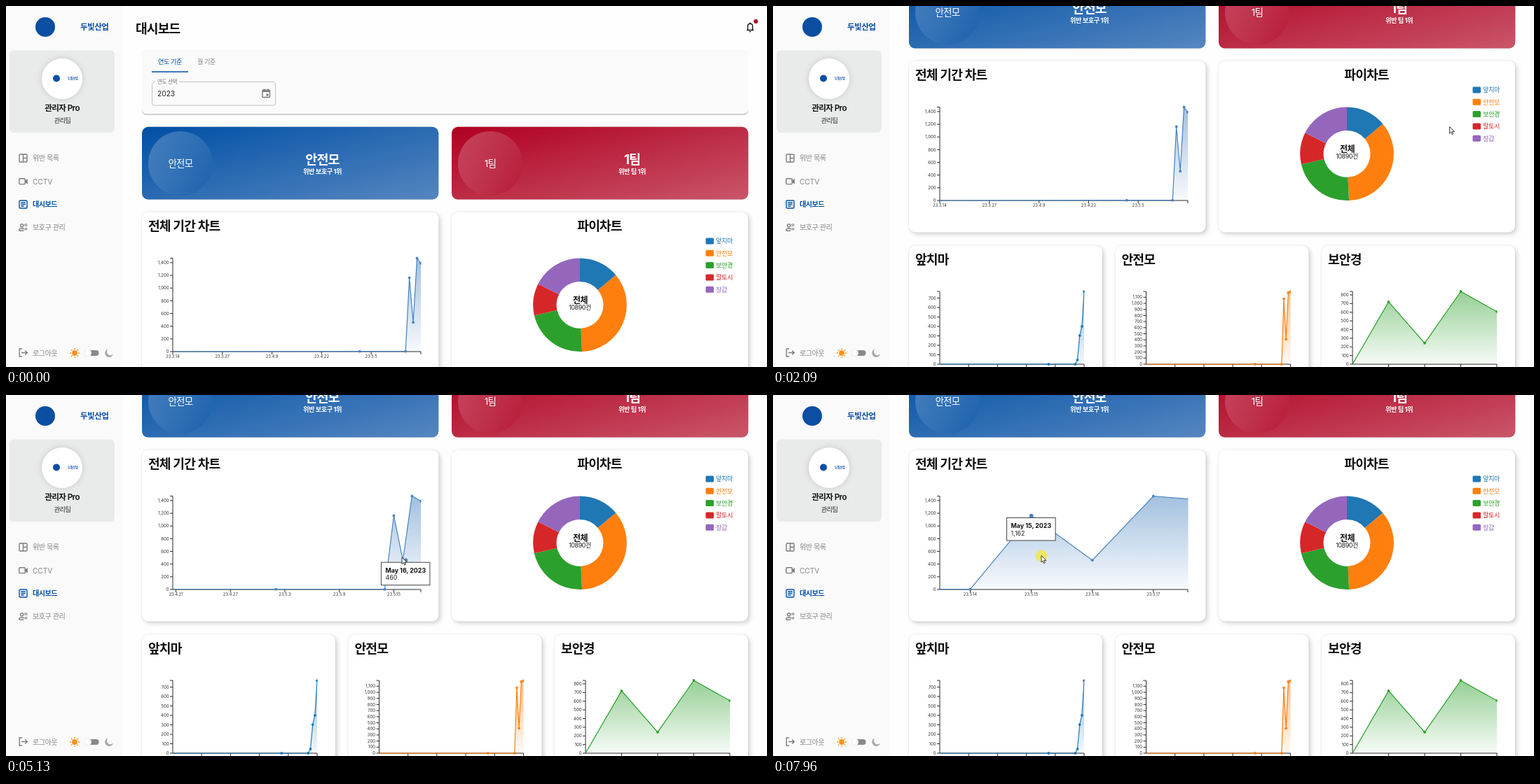
An HTML page that plays this animation: 1086x516 px, repeating every 8 s.

```html
<!DOCTYPE html>
<html lang="ko">
<head>
<meta charset="utf-8">
<title>대시보드</title>
<style>
html, body { margin: 0; width: 100%; height: 100%; overflow: hidden; background: #fefefe; }
svg { display: block; width: 100vw; height: 100vh; font-family: Inter, "Noto Sans CJK KR", "Noto Sans CJK", sans-serif; }
.ko { letter-spacing: -.05em; }
.card { fill: #fff; filter: drop-shadow(3px 3px 3px rgba(0,0,0,.15)) drop-shadow(0 0 1px rgba(0,0,0,.12)); }
.low { filter: drop-shadow(0 1px .7px rgba(0,0,0,.35)); }
.icon { fill: none; stroke: #7c7c7c; stroke-width: 1.4; }
.axis { fill: none; stroke: #2b2b2b; stroke-width: 1; }
</style>
</head>
<body>
<svg id="stage" viewBox="0 0 1086 516"></svg>
<script>
const LOOP = 8000;
const BLUE = '#0050a5', RED = '#b00020', GREY = '#858585';
const COLORS = ['#1f77b4', '#ff7f0e', '#2ca02c', '#d62728', '#9467bd'];
const NAMES = ['앞치마', '안전모', '보안경', '팔토시', '장갑'];
const TOTALS = [1516, 3850, 2410, 1201, 1913];
const SUM = TOTALS.reduce((a, b) => a + b);

// Text is placed by its vertical centre.
function text(x, cy, size, str, fill = '#111', weight = 400, anchor = 'start') {
  const ko = /[가-힣]/.test(str) ? ' class="ko"' : '';
  return `<text x="${x}" y="${cy + size * .36}" font-size="${size}" fill="${fill}" font-weight="${weight}" text-anchor="${anchor}"${ko}>${str}</text>`;
}
const rect = (x, y, w, h, r, attrs) => `<rect x="${x}" y="${y}" width="${w}" height="${h}" rx="${r}" ${attrs}/>`;
const circle = (x, y, r, attrs) => `<circle cx="${x}" cy="${y}" r="${r}" ${attrs}/>`;
const path = (d, attrs) => `<path d="${d}" ${attrs}/>`;
const icon = (x, y, body, color) =>
  `<g class="icon" transform="translate(${x} ${y})"${color ? ` style="stroke:${color}"` : ''}>${body}</g>`;

function gradient(id, from, to, a = 1, b = 1, right = 1) {
  return `<linearGradient id="${id}" x1="0" y1="0" x2="${right}" y2="1"><stop stop-color="${from}" stop-opacity="${a}"/><stop offset="1" stop-color="${to}" stop-opacity="${b}"/></linearGradient>`;
}

// Charts
const DAYS = [0, 49, 61, 62, 63, 64, 65];
const VALUES = [0, 4, 4, 1162, 460, 1470, 1390];
const MAIN = { id: 'main', x: 238, y: 360.5, w: 354, h: 133.5, max: 1470, step: 200, color: '#4682c0' };
const SMALL = [
  { max: 770, ticks: 5, days: DAYS, values: [0, 0, 0, 45, 303, 400, 768] },
  { max: 1195, ticks: 5, days: DAYS, values: [0, 0, 0, 1073, 410, 1175, 1190] },
  { max: 840, ticks: 4, days: [0, 1, 2, 3, 4], values: [0, 720, 243, 840, 607] }
].map((c, i) => ({ ...c, id: 'small' + i, x: 238 + 294.5 * i, y: 624, w: 206, h: 104, step: 100, color: COLORS[i] }));

const yOf = (c, v) => c.y + c.h * (1 - v / c.max);

function frame(c) {
  const x = c.x, b = c.y + c.h;
  let d = `M${x - 4} ${c.y}H${x}V${b}H${x + c.w}v4`, out = '';
  for (let v = 0; v <= c.max; v += c.step) {
    const y = yOf(c, v);
    d += `M${x - 4} ${y}H${x}`;
    out += text(x - 5.5, y, 6, v.toLocaleString('en-US'), '#333', 400, 'end');
  }
  for (let i = 1; i < c.ticks; i++) d += `M${x + c.w * i / c.ticks} ${b}v4`;
  return out + path(d, 'class="axis"');
}

function plot(c, xs, values) {
  const p = xs.map((x, i) => [x, yOf(c, values[i])]);
  const line = 'M' + p.map(q => q.map(n => n.toFixed(2)).join(' ')).join('L');
  const b = c.y + c.h;
  return `<g clip-path="url(#clip-${c.id})">` +
    path(`${line}L${p[p.length - 1][0]} ${b}L${p[0][0]} ${b}Z`, `fill="url(#area-${c.id})"`) +
    path(line, `fill="none" stroke="${c.color}" stroke-width="1.2"`) +
    p.slice(1).map(([x, y]) => circle(x, y, 1.9, `fill="${c.color}"`)).join('') + '</g>';
}

function defs() {
  return '<defs>' +
    gradient('blue', BLUE, '#5686c0') + gradient('red', RED, '#c9566a') +
    gradient('disc', '#fff', '#fff', .25, 0) +
    gradient('deep-blue', BLUE, BLUE, 0, .5) + gradient('deep-red', RED, RED, 0, .5) +
    [MAIN, ...SMALL].map(c => gradient('area-' + c.id, c.color, c.color, .5, .04, 0) +
      `<clipPath id="clip-${c.id}">${rect(c.x, c.y - 4, c.w + .5, c.h + 8, 0, '')}</clipPath>`).join('') +
    '</defs>';
}

function banner(x, tone, label, note) {
  return rect(x, 172.8, 423.3, 103.8, 9, `fill="url(#${tone})" style="filter:drop-shadow(0 .5px .6px rgba(0,0,0,.25))"`) +
    circle(x + 55, 225, 46, `fill="url(#deep-${tone})"`) +
    circle(x + 55, 225, 46, 'fill="url(#disc)"') +
    text(x + 55, 225, 13.5, label, '#fff', 400, 'middle') +
    text(x + 257.5, 219, 18.5, label, '#fff', 700, 'middle') +
    text(x + 257.5, 236.3, 9.2, note, '#fff', 700, 'middle');
}

function page() {
  return text(185, 32, 18.2, '대시보드', '#111', 600) +
    path('M1057 34.5h10M1058.5 34.5v-5.5q0-3.8 3.5-3.8t3.5 3.8v5.5M1062 25v-1.6', 'fill="none" stroke="#111" stroke-width="1.4"') +
    path('M1060.6 36h2.8q0 1.4-1.4 1.4t-1.4-1.4', 'fill="#111"') +
    circle(1070, 22, 3, `fill="${RED}"`) +
    rect(194, 62, 865, 92.5, 6, 'fill="#fafafa" class="low"') +
    text(217, 80, 9.2, '연도 기준', BLUE, 500) + text(273, 80, 9.2, '월 기준', GREY) +
    rect(208, 93.3, 52, 1.5, 0, `fill="${BLUE}"`) +
    rect(208.5, 108.5, 176, 33.5, 3, 'fill="none" stroke="#c2c2c2"') +
    rect(213, 106, 34, 5, 0, 'fill="#fafafa"') + text(216, 108, 7.6, '연도 선택', '#777') +
    text(216, 125.5, 10.2, '2023', '#222') +
    icon(365, 118.5, rect(1, 1.5, 10.5, 10.5, 1, '') + path('M1 3.5h10.5M3.5 0v2M9 0v2', 'stroke-width="2"') + rect(6.5, 7, 3, 3, 0, 'fill="#757575" stroke="none"')) +
    banner(194, 'blue', '안전모', '위반 보호구 1위') + banner(636, 'red', '1팀', '위반 팀 1위') +
    rect(194, 294.5, 423.5, 245, 9, 'class="card"') + rect(636, 294.5, 423, 245, 9, 'class="card"') +
    text(203, 314.5, 18.2, '전체 기간 차트', '#111', 600) + text(847, 314.5, 18.2, '파이차트', '#111', 600, 'middle') +
    frame(MAIN) + '<g id="main"></g><g id="pie"></g>' +
    text(819.5, 420.5, 12, '전체', '#111', 600, 'middle') + text(819, 431, 9, SUM + '건', '#222', 400, 'middle') +
    NAMES.map((n, i) => rect(998.5, 331.5 + 17.3 * i, 11.5, 9, 1.5, `fill="${COLORS[i]}"`) +
      text(1013, 336 + 17.3 * i, 9.2, n, COLORS[i])).join('') +
    SMALL.map((c, i) => {
      const last = c.days[c.days.length - 1];
      return rect(c.x - 44, 558.5, 276, 290, 9, 'class="card"') + text(c.x - 35, 578.5, 18.2, NAMES[i], '#111', 600) +
        frame(c) + plot(c, c.days.map(d => c.x + c.w * d / last), c.values);
    }).join('');
}

function sidebar() {
  const item = (y, label, on) => text(38, y, 10.1, label, on ? BLUE : GREY, on ? 700 : 400);
  return rect(0, 0, 166, 516, 0, 'fill="#fafafa"') +
    circle(56, 30, 14, 'fill="#0b4ea2"') + text(106, 30, 11.6, '두빛산업', '#0b4ea2', 600) +
    rect(5, 63.5, 150, 117.5, 6, 'fill="#e9ebeb"') +
    circle(80, 104, 29, 'fill="#fff" style="filter:drop-shadow(0 0 4px rgba(0,0,0,.15))"') +
    circle(72, 103.5, 5, 'fill="#0b4ea2"') + text(88, 103, 4.2, '두빛산업', '#0b4ea2', 600) +
    text(80, 145.5, 11.6, '관리자 Pro', '#111', 600, 'middle') + text(80.5, 164, 9, '관리팀', '#222', 400, 'middle') +
    item(217, '위반 목록') + item(251, 'CCTV') + item(283.5, '대시보드', true) + item(316.5, '보호구 관리') + item(496, '로그아웃') +
    icon(18, 211, rect(1, 1, 11, 11, 1.2, '') + path('M6.5 1v11M6.5 6.5H12', '')) +
    icon(18, 245, rect(.8, 1.8, 8.4, 7.8, .8, '') + path('M9.2 5L12.6 2.5v6.5L9.2 6.6', 'fill="#7c7c7c" stroke-width=".6"')) +
    icon(18, 277, rect(1, 1, 11, 11, 1.2, '') + path('M3.2 4h6.6M3.2 6.5h6.6M3.2 9h4.4', ''), BLUE) +
    icon(18, 310, circle(4.7, 3.8, 2.1, '') + path('M.8 11.3V10q0-2 4-2 2.3 0 3.4.9M.8 11.3h6.6', '') +
      circle(10.3, 3, 1.5, 'stroke-dasharray="1.5 .7"') + circle(10.4, 8.8, 1.3, 'stroke-dasharray="1.3 .6"')) +
    icon(18, 489, path('M5 1H1.2v11H5M4 6.5h8M9.2 3.4l3.1 3.1-3.1 3.1', '')) +
    circle(98, 496, 3.9, 'fill="#f7941d"') +
    Array.from({ length: 8 }, (_, i) => `<path d="M98 489v2" stroke="#f7941d" stroke-width="1.3" transform="rotate(${i * 45} 98 496)"/>`).join('') +
    rect(114, 492, 18.5, 8, 4, 'fill="#898989"') + circle(117, 496, 5, 'fill="#fff" style="filter:drop-shadow(0 .5px .7px rgba(0,0,0,.4))"') +
    path('M145.5 490.2a6 6 0 1 0 7.5 7.4a5 5 0 0 1-7.5-7.4Z', 'fill="#aaa"');
}

// Motion
const ramp = (t, a, b) => Math.min(1, Math.max(0, (t - a) / (b - a)));
const smooth = p => p * p * (3 - 2 * p);
const pulse = (t, on, off) => ramp(t, on, on + 200) - ramp(t, off, off + 250);

const PRESS = 7100;
// Pointer moves: start, end, x, y, height of the arc.
const MOVES = [
  [150, 560, 1038, 165, 0],
  [760, 870, 1066.5, 172, 0],
  [1470, 1700, 1066.5, 152, 0],
  [1880, 2280, 880, 190, 0],
  [2820, 2980, 865.5, 141, 0],
  [3560, 3980, 786.5, 156, 40],
  [4400, 4950, 565, 232, -50],
  [5980, 6200, 546, 170, 0],
  [6350, 6560, 502.5, 233, 0],
  [6880, PRESS, 400, 229.5, 0]
];
// Wheel zooms: start, end, notches, fixed x.
const ZOOMS = [[4700, 5130, 5, 591.8], [5480, 5830, 7, 594], [6700, 6850, 4, 529.4]];
// Times at which the chart label opens on a day.
const OPENED = [[5050, 63], [6100, 64], [6350, 63], [7050, 62]];

function scroll(t) {
  const turned = [1000, 1470, 1850].reduce((s, a) => s + 1 - (1 - ramp(t, a, a + 180)) ** 2, 0);
  return Math.min(216, 73 * turned);
}

function dragged(t) {
  const p = ramp(t, PRESS, 7960);
  return 30 * Math.sin(2 * Math.PI * p) - 17 * p;
}

// Day width and x of day 63; each notch scales by a quarter octave.
function view(t) {
  let d = MAIN.w / 65, x = MAIN.x + 63 * d;
  for (const [a, b, n, fixed] of ZOOMS) {
    const f = 2 ** (Math.floor(n * ramp(t, a, b)) / 4);
    d *= f;
    x = fixed + (x - fixed) * f;
  }
  x += dragged(t);
  return { d, x, at: day => x + (day - 63) * d };
}

function dates(v) {
  const first = Math.ceil(63 + (MAIN.x - v.x) / v.d - .05), step = Math.ceil(MAIN.w / v.d / 5 - .01);
  const b = MAIN.y + MAIN.h;
  let out = '';
  for (let i = 0; i < 5; i++) {
    const n = first + i * step, x = v.at(n), day = new Date(Date.UTC(2023, 2, 14 + n));
    if (x > MAIN.x + MAIN.w) break;
    out += path(`M${x} ${b}v4`, 'class="axis"') +
      text(x, b + 7.3, 5.9, `23.${day.getUTCMonth() + 1}.${day.getUTCDate()}`, '#333', 400, 'middle');
  }
  return out;
}

// The label stays where it opened while the wheel turns, and follows a drag.
function tip(t) {
  const open = OPENED.filter(o => o[0] <= t).pop();
  if (!open) return '';
  const [since, day] = open;
  const x = view(t >= PRESS ? t : since).at(day), value = VALUES[DAYS.indexOf(day)], y = yOf(MAIN, value);
  return circle(x, y, 2.8, `fill="${MAIN.color}"`) +
    rect(x - 35, y + 3, 69.5, 32.5, 0, 'fill="#fff" stroke="#444"') +
    text(x - 29, y + 14.2, 8.9, `May ${day - 47}, 2023`, '#111', 700) +
    text(x - 29, y + 25, 8.9, value.toLocaleString('en-US'), '#222');
}

function slices(t) {
  const glow = [0, pulse(t, 200, 330) + pulse(t, 2300, 2880), 0, 0, pulse(t, 4000, 4420)];
  const dim = Math.max(...glow);
  const pt = (r, a) => `${819 + r * Math.sin(a)} ${427.3 - r * Math.cos(a)}`;
  let b = 0;
  return COLORS.map((c, i) => {
    const a = b, grow = 6 * Math.min(1, glow[i] * 1.3), R = 66.8 + grow, r = 33.4 + grow;
    b += 2 * Math.PI * TOTALS[i] / SUM;
    return path(`M${pt(R, a)}A${R} ${R} 0 0 1 ${pt(R, b)}L${pt(r, b)}A${r} ${r} 0 0 0 ${pt(r, a)}Z`,
      `fill="${c}" opacity="${glow[i] ? 1 : 1 - .7 * dim}"`);
  }).join('');
}

function pointer(t) {
  if (t < MOVES[0][0]) return '';
  let x = 790, y = 455;
  for (const [a, b, toX, toY, arc] of MOVES) {
    const p = smooth(ramp(t, a, b));
    x += (toX - x) * p;
    y += (toY - y) * p - arc * Math.sin(Math.PI * p);
  }
  x += dragged(t);
  return (t >= PRESS ? circle(x, y + .5, 8.5, 'fill="#f1e74f" opacity=".85"') : '') +
    path('M0 0V9.6L2.2 7.6L3.7 11L5.3 10.3L3.8 7H6.9Z', `transform="translate(${x} ${y})" fill="#fff" stroke="#222" stroke-width=".9" stroke-linejoin="round"`);
}

const $ = id => document.getElementById(id);
$('stage').innerHTML = defs() + rect(0, 0, 1086, 516, 0, 'fill="#fefefe"') +
  `<g id="page">${page()}</g>${sidebar()}<g id="pointer"></g>`;

function draw(t) {
  const v = view(t);
  $('page').setAttribute('transform', `translate(0 ${-scroll(t)})`);
  $('main').innerHTML = dates(v) + plot(MAIN, DAYS.map(v.at), VALUES) + tip(t);
  $('pie').innerHTML = slices(t);
  $('pointer').innerHTML = pointer(t);
}

const start = performance.now();
function tick() {
  draw((performance.now() - start) % LOOP);
  requestAnimationFrame(tick);
}
draw(0);
requestAnimationFrame(tick);
</script>
</body>
</html>
```
